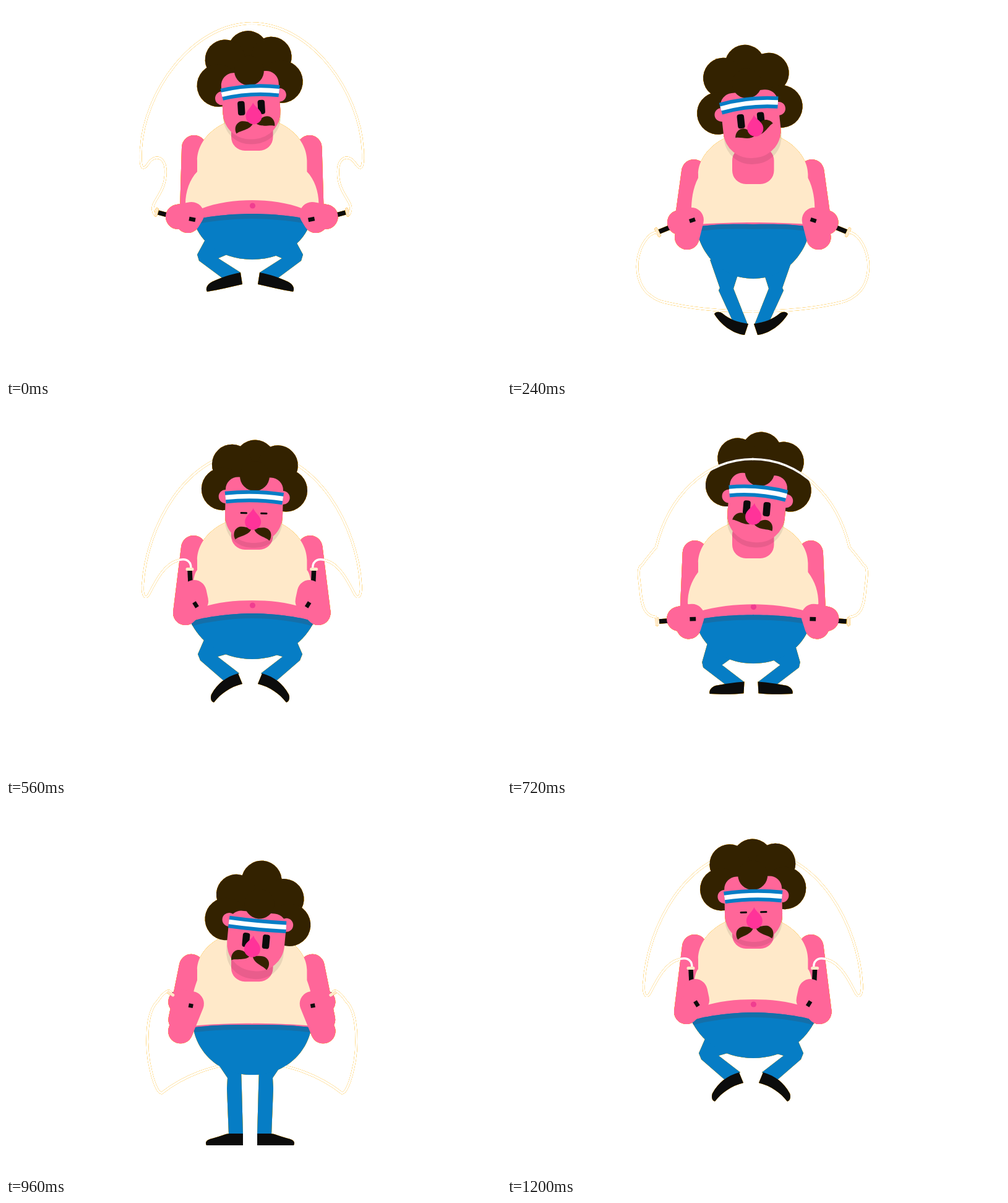
Animation, 800 px wide and 600 px high, one loop 1.24 s. Source, as an HTML page with a canvas:

```html
<!DOCTYPE html>
<html lang="en">
<head>
<meta charset="utf-8">
<title>Rope skipping</title>
<style>
  html, body { margin: 0; width: 100%; height: 100%; overflow: hidden; background: #fff; }
  canvas { display: block; filter: drop-shadow(0 0 .5px #ffb000) drop-shadow(0 0 .4px #ffb000); }
</style>
</head>
<body>
<canvas id="stage" width="800" height="600"></canvas>
<script>
const ctx = document.getElementById('stage').getContext('2d');
const LOOP = 1240, JUMP = 640, SWAY = 1280, STEP = 40;
const PINK = '#ff6699', CREAM = '#ffe9c9', HAIR = '#332200', BLUE = '#067dc5',
      BELT = '#146fa9', NOSE = '#ff3399', BLACK = '#0c0c0c', WHITE = '#fff';

// Poses by time within one jump; paths describe the left half of the figure.
const ropeNear = {
  0:   'M240 337C228 317 258 308 258 268C258 243 240 238 229 256C217 272 217 250 218 232',
  40:  'M240 338C226 325 248 318 246 285C243 262 228 255 218 262C207 268 206 250 207 230',
  120: 'M241 350C225 355 195 345 193 310C191 290 200 270 220 255C235 245 255 235 275 230',
  240: 'M243 366C230 366 215 385 211 412C208 440 219 460 233 469C238 473 246 477 254 479',
  400: 'M292 246C298 230 287 221 272 226C240 236 231 320 234 370C236 400 243 445 249 441',
  560: 'M299 264C299 250 288 247 276 252C255 258 241 287 231 306C226 315 220 310 221 292'
};
const ropeFar = {
  0:   'M218 232C223 140 300 28 398 28',
  40:  'M207 230C212 110 290 9 398 9',
  120: 'M275 230C310 220 350 215 398 215',
  240: 'M254 479C300 490 350 494 398 494',
  400: 'M249 441C262 360 310 290 398 290',
  560: 'M221 292C226 200 290 75 398 75'
};
const upperArm = {
  0: 'M304 229L301 330', 240: 'M302 268L292 340',
  400: 'M298 253L275 355', 560: 'M303 231L290 336'
};
const hand = {
  0: 'M278 341L300 337L294 347', 240: 'M279 350L298 346L291 374',
  400: 'M288 290L303 300L274 356', 560: 'M304 303L307 317L290 336'
};
const handle = {
  0: 'M246 334L268 340', 240: 'M246 365L268 356',
  400: 'M291 249L289 272', 560: 'M297 267L298 288'
};
const handleEnd = {
  0: 'M296 344L306 346', 240: 'M295 348L304 345',
  400: 'M296 303L301 309', 560: 'M304 319L309 327'
};
const handleCap = {
  0: 'M244 329L242 338', 240: 'M241 361L246 371',
  400: 'M287 248L295 247', 560: 'M293 265.5L301 265.5'
};
const shirt = {
  0:   'M399 180C345 180 309 215 309 250L309 268C297 280 290 300 290 320L315 328C340 318 370 314 399 314',
  240: 'M399 203C345 203 309 240 309 272L309 278C300 295 298 315 298 330L299 354C330 351 370 350 399 350',
  400: 'M399 205C345 205 309 230 309 262L309 290C303 310 299 330 297 345L299 362C330 358 370 357 399 357',
  560: 'M399 181C345 181 309 216 309 251L309 267C303 272 300 300 300 320L318 327C340 319 370 316 399 316'
};
const pants = {
  0:   'M399 336C365 336 325 340 303 346C310 375 340 410 399 410',
  240: 'M399 353C365 352 330 353 306 357C308 385 335 441 399 441',
  400: 'M399 359C365 359 330 360 299 364C305 395 335 432 399 432',
  560: 'M399 337C365 337 325 342 298 350C312 380 345 411 399 411'
};
const standing = {
  leg: 'M335 409L358 443L357 460L360 535L383 535L381 460L380 431L399 410',
  shoe: 'M383 533L383 552C363 552 343 552 324 552C321 546 325 543 333 541C345 538 355 533 362 533'
};
const leg = {
  0:   'M322 378L309 402L312 412L351 441L379 431L343 408L357 402L399 385',
  240: 'M328 410L344 456L342 460L364 508L389 515L366 457L372 438L399 420',
  320: standing.leg, 400: standing.leg,
  560: 'M320 380L310 403L314 413L352 446L377 434L342 407L356 403L399 385'
};
const shoe = {
  0:   'M379 431L382 450C363 454 344 459 325 462C322 457 325 450 333 446C348 439 362 434 379 431',
  240: 'M390 514L384 532C365 530 345 515 335 498C338 494 343 494 348 497C360 507 372 511 390 514',
  320: standing.shoe, 400: standing.shoe,
  560: 'M375 434L382 451C362 456 347 467 336 481C331 480 330 473 332 468C342 450 355 440 375 434'
};
// head height, neck end, face top, face bottom, ear height, chin shadow, band bend, moustache droop
const face = {
  0: '138.5 234 -32 77 8 8 -4 10', 240: '159 288 -21 87 12 10 -4 -26',
  400: '226 285 -20 63 -20 15 6 63', 560: '149 234 -32 74 0 8 -3 25'
};
// top curl height, upper curls x and y, lower curls y
const curls = { 0: '-66 37.5 -54 -13', 240: '-64 37 -47 9', 400: '-79 40 -45 -18', 560: '-60 37 -52 -12' };
const eyeHeight = { 0: '23', 480: '23', 560: '3' };
// head tilt and extra moustache turn, over two jumps
const sway = {
  0: '-3.5 -8', 240: '-6.2 -15', 400: '-3.7 0', 560: '1.3 1',
  640: '3.5 8', 880: '6.2 15', 1040: '3.7 4', 1200: '-1.2 -1'
};

// Smooth cyclic interpolation without overshoot of every number in a pose string.
function tween(track, t, span = JUMP) {
  const number = /-?[\d.]+/g;
  const times = Object.keys(track).map(Number), n = times.length;
  const poses = times.map(k => track[k].match(number).map(Number));
  const i = times.findLastIndex(k => k <= t);
  const time = j => times[(j + n) % n] + span * Math.floor(j / n);
  const h = time(i + 1) - time(i), u = (t - time(i)) / h;
  let c = 0;
  return track[0].replace(number, () => {
    const value = j => poses[(j + n) % n][c];
    const slope = j => (value(j + 1) - value(j)) / (time(j + 1) - time(j));
    const tangent = j => {
      const a = slope(j - 1), b = slope(j);
      return a * b > 0 ? 2 * a * b / (a + b) : 0;
    };
    const ease = u * u * (3 - 2 * u);
    const result = value(i) * (1 - ease) + value(i + 1) * ease
      + h * u * (1 - u) * ((1 - u) * tangent(i) - u * tangent(i + 1));
    c++;
    return result.toFixed(2);
  });
}
const values = (...args) => tween(...args).split(' ').map(Number);

function fill(path, color) {
  ctx.fillStyle = color;
  ctx.fill(new Path2D(path));
}
function stroke(path, color, width, cap = 'round') {
  ctx.strokeStyle = color;
  ctx.lineWidth = width;
  ctx.lineCap = cap;
  ctx.lineJoin = 'round';
  ctx.stroke(new Path2D(path));
}
function disc(x, y, r, color) {
  ctx.fillStyle = color;
  ctx.beginPath();
  ctx.arc(x, y, r, 0, 7);
  ctx.fill();
}
function box(x, y, w, h, radii, color) {
  ctx.fillStyle = color;
  ctx.beginPath();
  ctx.roundRect(x, y, w, h, radii);
  ctx.fill();
}
function mirrored(axis, paint) {
  paint();
  ctx.save();
  ctx.translate(2 * axis, 0);
  ctx.scale(-1, 1);
  paint();
  ctx.restore();
}
const turn = degrees => ctx.rotate(degrees * Math.PI / 180);

function drawHead(t, p) {
  const [y, , top, chin, ear, shade, bend, droop] = values(face, p);
  const [curlTop, curlX, curlY, curlLow] = values(curls, p);
  const [eye] = values(eyeHeight, p);
  const [tilt, twist] = values(sway, t, SWAY);
  const jaw = [20, 20, 44, 44];
  ctx.save();
  ctx.translate(399.5 + 1.3 * tilt, y);
  turn(tilt);

  box(-46.5, top + 40, 93, chin - top - 40 + shade, [0, 0, 44, 44], 'rgba(0,0,0,.085)');
  disc(0, -30, 46, HAIR);
  disc(0, curlTop, 32.5, HAIR);
  mirrored(0, () => {
    disc(curlX, curlY, 32.5, HAIR);
    disc(51.3, curlLow, 34.3, HAIR);
  });
  mirrored(0, () => disc(46.5, ear, 11, PINK));
  box(-46.5, top, 93, chin - top, jaw, PINK);
  disc(0, -34, 24, HAIR);
  const band = `M-46.5 ${-bend / 2}Q0 ${1.5 * bend} 46.5 ${-bend / 2}`;
  stroke(band, BLUE, 19.5, 'butt');
  stroke(band, WHITE, 7.5, 'butt');

  mirrored(0, () => box(10.5, 26 - eye / 2, 11.5, eye, Math.min(4, eye / 2), BLACK));

  ctx.translate(-.9 * tilt, 0);
  ctx.save();
  ctx.translate(0, 51);
  turn(twist);
  mirrored(0, () => {
    ctx.save();
    ctx.translate(2, 0);
    turn(droop);
    fill('M0 0C8 -6 14 -11 20 -10C28 -9 32 -1 31 6C24 3 8 9 0 0', HAIR);
    ctx.restore();
  });
  ctx.restore();
  fill('M0 18C3 26 13 30 13 40A13 13 0 0 1 -13 40C-13 30 -3 26 0 18', NOSE);
  ctx.restore();
}

function draw(t) {
  const p = t % JUMP, axis = 397.3, ropeInFront = p < 240;
  const pose = track => tween(track, p);
  const farRope = () => mirrored(axis, () => stroke(pose(ropeFar), WHITE, 3.4));
  const hips = pose(pants), waist = +hips.match(/ ([\d.]+)/)[1];
  const neck = values(face, p)[1];

  ctx.clearRect(0, 0, 800, 600);
  if (!ropeInFront) farRope();

  mirrored(axis, () => stroke(pose(upperArm), PINK, 40));
  mirrored(394.5, () => {
    fill(pose(leg), BLUE);
    fill(pose(shoe), BLACK);
  });
  mirrored(398, () => fill(`M399 ${waist - 30}L300 ${waist - 20}L306 ${waist + 10}L399 ${waist + 10}`, PINK));
  disc(398.5, waist - 13, 4.6, '#f03d90');
  mirrored(397.7, () => fill(pose(shirt), CREAM));
  mirrored(398, () => {
    fill(hips, BLUE);
    ctx.save();
    ctx.clip(new Path2D(hips));
    stroke(hips.slice(0, hips.lastIndexOf('C')), BELT, 16);
    ctx.restore();
  });
  box(364, neck - 60, 67.5, 60, 22, PINK);
  drawHead(t, p);

  mirrored(axis, () => {
    stroke(pose(handle), BLACK, 7.5, 'butt');
    stroke(pose(hand), PINK, 40);
    stroke(pose(handleEnd), BLACK, 6.5, 'butt');
    stroke(pose(ropeNear), WHITE, 3.4);
    stroke(pose(handleCap), CREAM, 5);
  });
  if (ropeInFront) farRope();
}

function frame() {
  const t = performance.now() % LOOP;
  draw(Math.floor(t / STEP) * STEP);
  requestAnimationFrame(frame);
}
frame();
</script>
</body>
</html>
```
